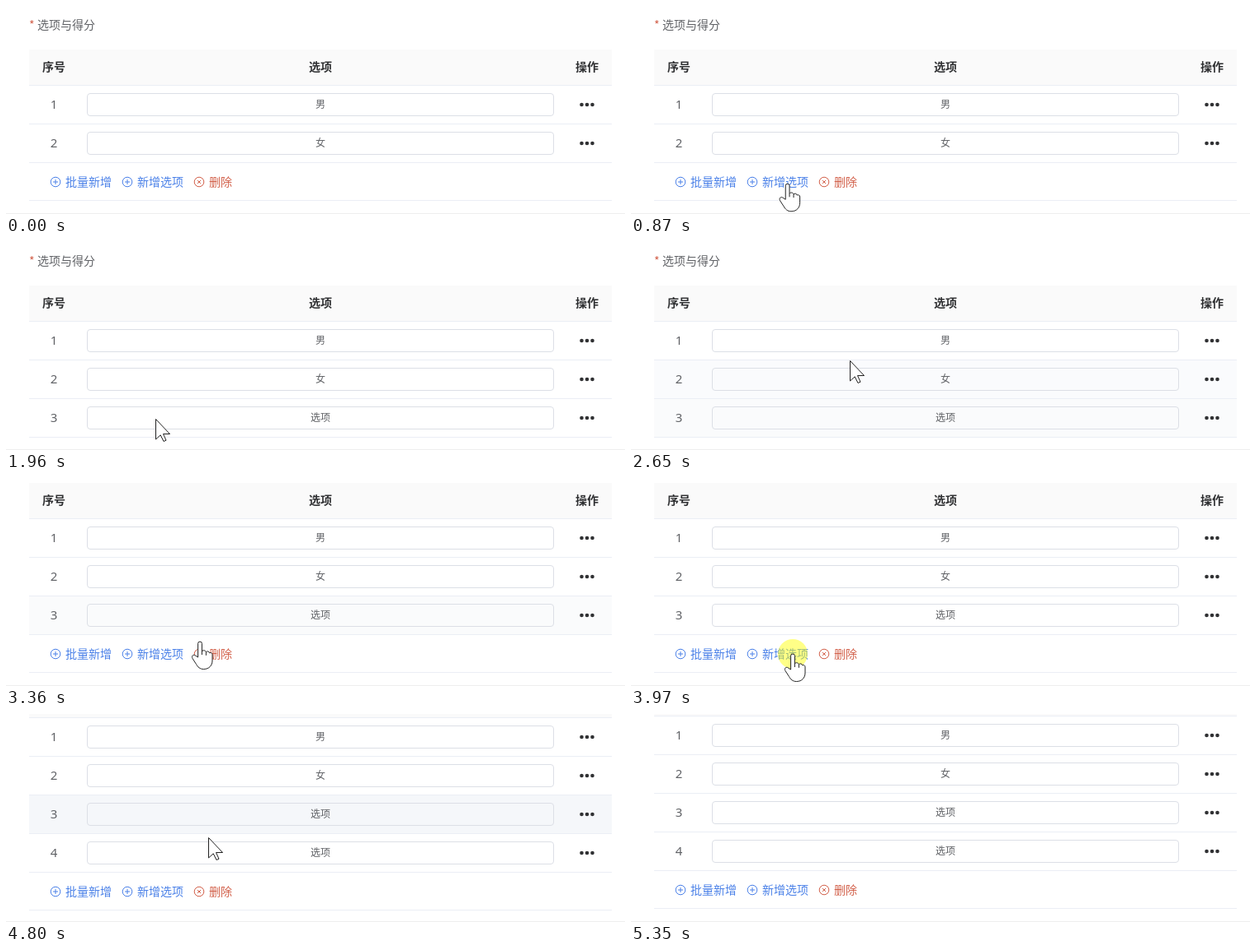
An HTML page that plays this animation: 750x253 px, repeating every 5810 ms.

```html
<!DOCTYPE html>
<html lang="zh-CN">
<head>
<meta charset="utf-8">
<title>选项与得分</title>
<style>
  html, body { margin: 0; width: 100%; height: 100%; overflow: hidden; background: #fff; }
  svg { display: block; width: 750px; height: 253px; }
  text { font: 14px "Noto Sans CJK SC", "Noto Sans CJK", "Noto Sans", sans-serif; fill: #606266; }
  .head { font-weight: 700; fill: #303133; }
  .mid { text-anchor: middle; }
  .num { font: 15px "Noto Sans", "Open Sans", sans-serif; }
  .value { font-size: 12px; }
  .line { fill: #ebeef5; }
  .input { fill: none; stroke: #dcdfe6; }
  .dots { fill: #303133; }
  .blue text { fill: #4a80e8; }
  .blue path { stroke: #4a80e8; }
  .red text, text.star { fill: #d2604a; }
  .red path { stroke: #d2604a; }
  .icon { fill: none; stroke-width: 1; }
  .cursor { fill: #fff; stroke: #222; stroke-linejoin: round; }
</style>
</head>
<body>
<svg viewBox="0 0 750 253">
  <g id="page">
    <text class="star" x="28" y="28">*</text>
    <text x="38" y="28">选项与得分</text>
    <rect x="28" y="53" width="706" height="43" fill="#fafafa"/>
    <rect class="line" x="28" y="96" width="706" height="1"/>
    <text class="head mid" x="58" y="79">序号</text>
    <text class="head mid" x="381" y="79">选项</text>
    <text class="head mid" x="704" y="79">操作</text>
    <g id="rows"></g>
    <g id="footer">
      <g id="links"></g>
      <rect class="line" x="28" y="45" width="706" height="1"/>
    </g>
  </g>
  <rect id="mask" width="750" height="253" fill="#fff"/>
  <path id="spinner" fill="none" stroke="#606266" stroke-width="2"/>
  <rect y="252" width="750" height="1" fill="#eee"/>
  <g id="pointer">
    <circle id="click" r="18" fill="#ff0" fill-opacity=".47"/>
    <path id="arrow" class="cursor" d="M.5 .5V25L6.2 19.8 10 27.5 13 26.2 9.5 18.5H17.5Z"/>
    <path id="hand" class="cursor" d="M-2.4 19V2.4a2.4 2.4 0 0 1 4.8 0V12c1-2 4.6-1.6 5 .8c1-1.6 4-1 4.2 1c1.6-1 3.4 .2 3.4 2V23C15 29 11 33.5 4.5 33.5C0 33.5-2.5 31-4.5 27.5L-9 20.5c-1.8-3 1.2-5.5 3.5-3.5ZM2.4 12v4M7.4 12.8v4"/>
  </g>
</svg>
<script>
const LOOP = 5810, ROW = 47, TOP = 97;
const CLICKS = [1200, 3900], DELAY = 140;
const SCROLLS = [2720, 4630];

// Hovered rows: index, enter, leave.
const HOVERS = [[2, 1960, 2530], [1, 2530, 2850], [2, 2900, 3240], [2, 4220, 4800], [3, 4830, 5120]];

// Pointer moves: start, end, x, y.
const ENTRY = { x: 335, y: 238 };
const MOVES = [[460, 940, 181, 215], [2540, 2650, 265, 144], [3200, 3360, 235, 199],
  [3430, 3640, 196, 214], [4110, 4330, 245, 150], [5100, 5350, 252, 252]];

const $ = id => document.getElementById(id);
const set = (el, attrs) => { for (const k in attrs) el.setAttribute(k, attrs[k]); };
const show = (el, on) => { el.style.display = on ? "" : "none"; };

const ramp = (t, start, span) => Math.min(1, Math.max(0, (t - start) / span));
const easeOut = p => 1 - (1 - p) ** 3;
const smooth = p => p * p * (3 - 2 * p);

const scrollAt = t => SCROLLS.reduce((y, s) => y + ROW * easeOut(ramp(t, s, 260)), 0);
const maskAt = age => .85 * ramp(age, 0, 175) * (1 - ramp(age, 250, 250));
const hoverAt = (row, t) => HOVERS.reduce((sum, [i, enter, leave]) =>
  i === row ? sum + ramp(t, enter, 250) - ramp(t, leave, 250) : sum, 0);

const pointerAt = t => MOVES.reduce((at, [start, end, x, y]) => {
  const p = smooth(ramp(t, start, end - start));
  return { x: at.x + (x - at.x) * p, y: at.y + (y - at.y) * p };
}, ENTRY);

// Arc whose tail turns steadily while its length grows.
function arc(age) {
  const tail = age * .18, length = 8 + 500 * (age / 750) ** 2;
  const point = deg => {
    const a = deg * Math.PI / 180;
    return `${382 + 18.6 * Math.cos(a)} ${-8 + 18.6 * Math.sin(a)}`;
  };
  return `M${point(tail)}A18.6 18.6 0 ${length > 180 ? 1 : 0} 1 ${point(tail + length)}`;
}

$("rows").innerHTML = ["男", "女", "选项", "选项"].map((label, i) => `
  <g transform="translate(0 ${TOP + i * ROW})">
    <rect x="28" width="706" height="46" fill="#f5f7fa"/>
    <rect class="input" x="98.5" y="9.5" width="565" height="27" rx="3.5"/>
    <text class="num mid" x="58" y="28">${i + 1}</text>
    <text class="value mid" x="381" y="27">${label}</text>
    ${[-6.5, 0, 6.5].map(dx => `<circle class="dots" cx="${704 + dx}" cy="23" r="2.3"/>`).join("")}
    <rect class="line" x="28" y="46" width="706" height="1"/>
  </g>`).join("");

const RING = "M-5.8 0a5.8 5.8 0 1 0 11.6 0a5.8 5.8 0 1 0-11.6 0";
const PLUS = "M-3 0H3M0-3V3", CROSS = "M-2-2L2 2M2-2L-2 2";
$("links").innerHTML = [
  ["批量新增", "blue", PLUS], ["新增选项", "blue", PLUS], ["删除", "red", CROSS]
].map(([label, tone, mark], i) => `
  <g class="${tone}" transform="translate(${60 + i * 87} 23)">
    <path class="icon" d="${RING}${mark}"/><text x="12" y="5">${label}</text>
  </g>`).join("");

const rows = [...$("rows").children];

function draw(t) {
  const added = CLICKS.map(c => c + DELAY).filter(a => t >= a);
  const count = 2 + added.length, footer = TOP + count * ROW;
  const age = added.length ? t - added[added.length - 1] : 0;
  const scroll = scrollAt(t), mask = maskAt(age), { x, y } = pointerAt(t);

  set($("page"), { transform: `translate(0 ${-Math.round(scroll)})` });
  rows.forEach((row, i) => {
    show(row, i < count);
    set(row.firstElementChild, { opacity: hoverAt(i, t) });
  });
  set($("footer"), { transform: `translate(0 ${footer})` });

  set($("mask"), { opacity: mask });
  set($("spinner"), { d: arc(age), opacity: mask });

  const overLink = x < 276 && y > footer - scroll + 6;
  show($("pointer"), t >= 460 && t < 5350);
  set($("pointer"), { transform: `translate(${x} ${y})` });
  show($("hand"), overLink);
  show($("arrow"), !overLink);
  show($("click"), CLICKS.some(c => t >= c && t < c + DELAY));
}

const begin = performance.now();
function tick() {
  draw((performance.now() - begin) % LOOP);
  requestAnimationFrame(tick);
}
tick();
</script>
</body>
</html>
```
